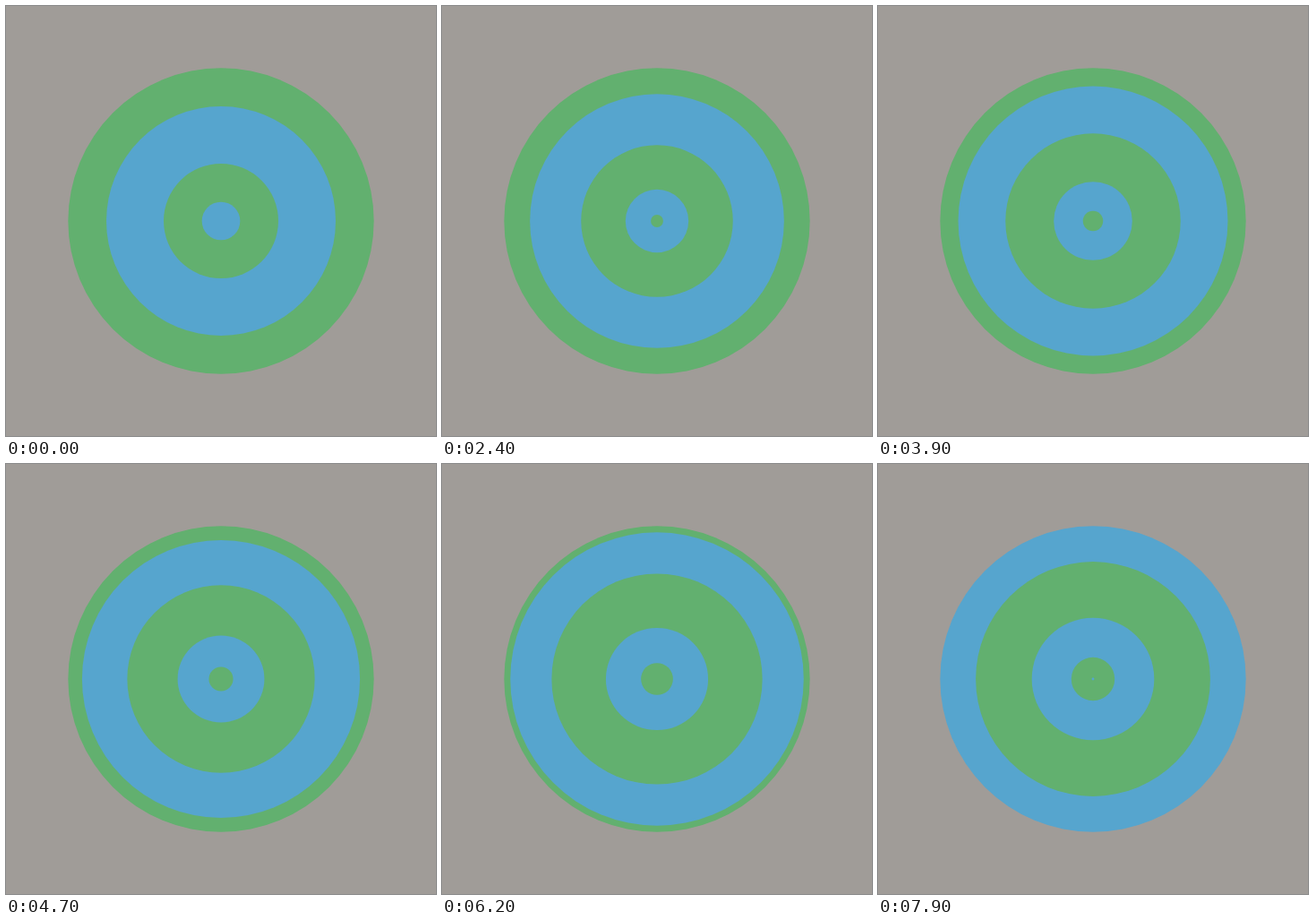
An HTML page with a canvas that plays this animation: 480 px wide and 480 px high, repeating every 8 s.

```html
<!DOCTYPE html>
<html>
<head>
<meta charset="utf-8">
<style>
html, body { margin: 0; width: 100%; height: 100%; overflow: hidden; background: #a09c98; }
canvas { display: block; }
</style>
</head>
<body>
<canvas id="stage" width="480" height="480"></canvas>
<script>
const ctx = document.getElementById('stage').getContext('2d');
const COLORS = ['#62b06f', '#56a5ce'];
const RADII = [0, 1, 3, 6, 8].map(n => n * 64 / 3);
const LOOP = 8000, STEP = 100, CYCLE = 7400;

function disc(radius, color) {
  ctx.fillStyle = color;
  ctx.beginPath();
  ctx.arc(240, 240, radius, 0, 2 * Math.PI);
  ctx.fill();
}

function draw(time) {
  const phase = time / CYCLE;
  const turn = Math.floor(phase);
  const part = phase - turn;
  ctx.fillStyle = '#a09c98';
  ctx.fillRect(0, 0, 480, 480);
  // Each ring grows into the next one's place; the outermost stays put.
  for (let i = 4; i >= 0; i--) {
    const next = RADII[Math.min(i + 1, 4)];
    disc(RADII[i] + (next - RADII[i]) * part, COLORS[(i + turn) % 2]);
  }
}

const start = performance.now();
function tick() {
  const time = (performance.now() - start) % LOOP;
  draw(Math.floor(time / STEP) * STEP);
  requestAnimationFrame(tick);
}
tick();
</script>
</body>
</html>
```
